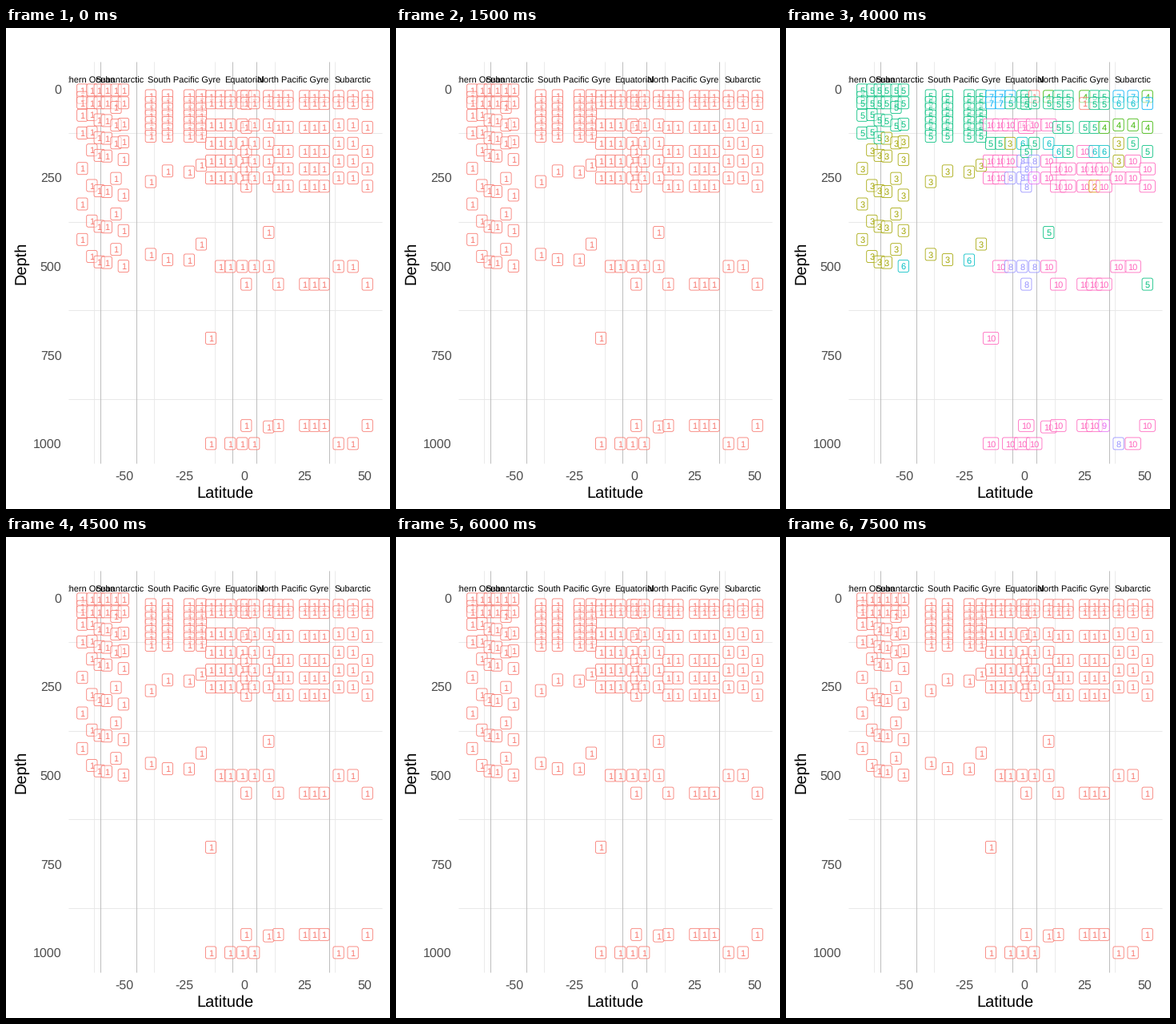
Write a matplotlib script that moves like this. It is 480 by 600 pixels and loops after 8 s.

```python
import random

import matplotlib.pyplot as plt
from matplotlib.animation import FuncAnimation
from matplotlib.patches import FancyBboxPatch, Rectangle

W, H = 480, 600
STEPS, INTERVAL = 16, 500
LEFT, RIGHT, TOP, BOTTOM = 78, 470, 42, 543
HUES = ["#F8766D", "#D89000", "#A3A500", "#39B600", "#00BF7D",
        "#00BFC4", "#00B0F6", "#9590FF", "#E76BF3", "#FF62BC"]

plt.rcParams.update({"font.family": "Liberation Sans", "text.hinting": "none"})


def px(lat):
    return 298.2 + 3.01 * lat


def py(depth):
    return 75.6 + 0.4428 * depth


def casts():
    """All samples as (latitude, depth), station by station."""
    polar = [(-67.4, -75), (-63.4, -27), (-60.3, -12),
             (-57.3, -10), (-53.4, -47), (-50.3, 0)]
    for lat, shift in polar:
        for d in (4, 40, *(shift + s for s in (100, 150, 200, 300, 400, 500))):
            yield lat, d

    gyre = [(-39, 262, 467), (-32, 232, 482), (-23, 235, 483), (-18, 216, 438)]
    for lat, mid, low in gyre:
        for d in (*range(20, 136, 19), mid, low):
            yield lat, d

    near, far = (22, 40, 102, 154, 204, 252), (22, 42, 109, 177, 226, 275)
    north = [
        ((-14,), near, (703, 1000)),
        ((-10,), near, (501,)),
        ((-6, -1, 4, 39, 45), near, (501, 1000)),
        ((10,), near, (405, 501, 953)),
        ((0.7, 14, 25, 29, 33, 51), far, (551, 949)),
        ((18,), far, ()),
    ]
    for lats, upper, lower in north:
        for lat in lats:
            for d in upper + lower:
                yield lat, d


def cluster(lat, d, rng):
    """Cluster by water mass, with a few stray members."""
    stray = rng.random()
    if lat < -16:
        if d < 140:
            return 4
        return 9 if stray < 0.07 else 2
    if stray < 0.15:
        return rng.randint(1, 10)
    if d < 60:
        return 4 if -3 < lat < 35 else 8
    if d < 120:
        return 3 if lat < 12 else 4 if lat < 30 else 10
    if d < 190:
        return rng.choice((2, 4, 9))
    return 6 if abs(lat) < 9 and d < 900 else 3


class Tag:
    """Rounded label showing a cluster number in its colour."""

    def __init__(self, ax, x, y, z):
        self.x = x
        self.box = FancyBboxPatch(
            (x, y - 7.5), 13.3, 15, lw=0.8, fc=(1, 1, 1, 0.5), zorder=z,
            boxstyle="round,pad=0,rounding_size=2.16")
        ax.add_patch(self.box)
        self.num = ax.text(x, y + 4.2, "", size=11, ha="center", zorder=z)

    def show(self, group):
        text, color = str(group), HUES[group - 1]
        width = 7.2 + 6.1 * len(text)
        self.box.set_x(self.x - width / 2)
        self.box.set_width(width)
        self.box.set_edgecolor(color)
        self.num.set_text(text)
        self.num.set_color(color)


fig = plt.figure(figsize=(W / 72, H / 72), dpi=72, facecolor="white")
ax = fig.add_axes([0, 0, 1, 1])
ax.set_xlim(0, W)
ax.set_ylim(H, 0)
ax.axis("off")


def rule(xs, ys, color):
    ax.plot(xs, ys, color=color, lw=1, solid_capstyle="butt")


for k in range(5):
    rule([px(25 * k - 62.5)] * 2, [TOP, BOTTOM], "#EBEBEB")
for k in range(4):
    rule([LEFT, RIGHT], [py(250 * k + 125)] * 2, "#E8E8E8")
for lat in (-60, -45, -5, 5, 35):
    rule([px(lat)] * 2, [TOP, BOTTOM], "#BEBEBE")

for k in range(5):
    ax.text(69.5, py(250 * k) + 5.8, str(250 * k), size=16, color="#4D4D4D",
            ha="right")
    ax.text(px(25 * k - 50), 564, str(25 * k - 50), size=16, color="#4D4D4D",
            ha="center")
ax.text(273.5, 585.5, "Latitude", size=20, ha="center")
ax.text(28.3, 293, "Depth", size=20, ha="right", va="center", rotation=90)

panel = Rectangle((LEFT, TOP), RIGHT - LEFT, BOTTOM - TOP,
                  transform=ax.transData)
for lat, name in ((-67, "Southern Ocean"), (-52, "Subantarctic"),
                  (-25, "South Pacific Gyre"), (0, "Equatorial"),
                  (20, "North Pacific Gyre"), (45, "Subarctic")):
    label = ax.text(px(lat), 69, name, size=11, ha="center", zorder=3)
    label.set_clip_path(panel)
    label.set_clip_on(True)

points = sorted(casts())
tags = [Tag(ax, px(lat), py(d), 10 + i) for i, (lat, d) in enumerate(points)]
rng = random.Random(4)
groups = [cluster(lat, d, rng) for lat, d in points]


def shown(step):
    """One cluster every third step, otherwise ten in varying order."""
    if step % 3 == 0:
        return [1] * len(points)
    names = list(range(1, 11))
    if step != 2:
        random.Random(step).shuffle(names)
    return [names[g - 1] for g in groups]


def update(step):
    for tag, group in zip(tags, shown(step)):
        tag.show(group)
    return []


anim = FuncAnimation(fig, update, frames=STEPS, interval=INTERVAL,
                     repeat=True, repeat_delay=0, blit=False)
plt.show()
```
